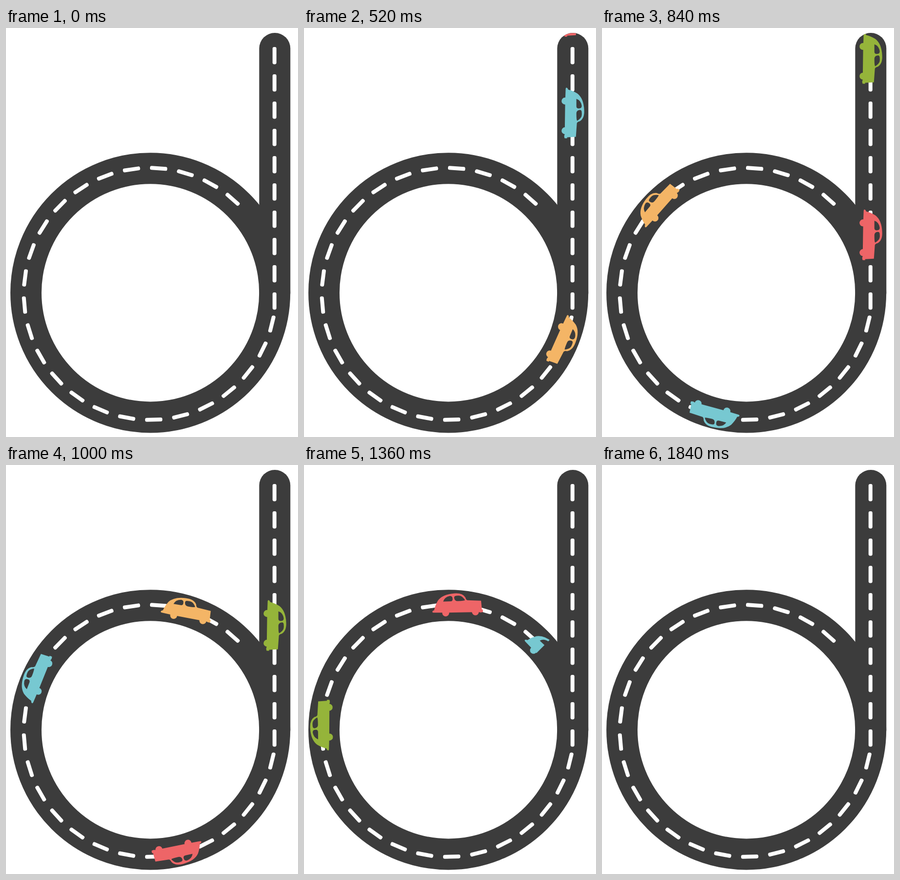
An HTML page that plays this animation: 600x840 px, repeating every 1880 ms.

```html
<!DOCTYPE html>
<html lang="en">
<head>
<meta charset="utf-8">
<title>Road letter</title>
<style>
  html, body { margin: 0; width: 100%; height: 100%; overflow: hidden; background: #fff; }
  svg { display: block; width: 600px; height: 840px; }
</style>
</head>
<body>
<svg viewBox="0 0 600 840">
  <defs>
    <clipPath id="entry"><path d="M0 840V200H520.5V42a31.9 31.9 0 0 1 63.8 0V840Z"/></clipPath>
    <clipPath id="exit"><path d="M0 0H864L24 840H0Z"/></clipPath>
    <g id="car">
      <path fill-rule="evenodd" d="M-58-2Q-58-5-54-6Q-52-15-46-25Q-36-38-12-39Q5-40 11-30Q12-25 15-24L43-22 44-4 46-4V1Q42 3 38 1L-30 0-56-1Z
        M-35-23Q-32-32-21-34Q-16-34-15.5-30Q-14-23-20-23Z
        M-12-29Q-13-34-7-34Q1-35 5-31Q9-27 10-24.5Q9-23-5-23Q-11-23-12-29Z"/>
      <circle cx="-30.5" cy=".3" r="7.2"/>
      <circle cx="30.5" cy=".3" r="7.2"/>
    </g>
  </defs>
  <g fill="none" stroke="#3c3c3c" stroke-width="64" stroke-linecap="round">
    <circle cx="296.6" cy="543.8" r="255.6"/>
    <path d="M552.3 544V42"/>
  </g>
  <g id="dashes" fill="#fff"></g>
  <g id="cars"></g>
</svg>
<script>
const LOOP = 1880, STEP = 40, GAP = 200;
const CX = 295, CY = 546, LANE = 258;
const COLORS = ['#f4b566', '#77c8d1', '#ee6567', '#95b43a'];

// Distance travelled along the lane: [ms, px]
const KEYS = [[80, -48], [160, -4.5], [280, 119], [360, 252.5], [400, 335.5], [480, 536],
  [600, 898.6], [680, 1148], [800, 1477], [920, 1725], [1000, 1847], [1120, 1977],
  [1200, 2028], [1280, 2070]];

function add(parent, tag, attrs) {
  const el = document.createElementNS('http://www.w3.org/2000/svg', tag);
  for (const k in attrs) el.setAttribute(k, attrs[k]);
  return document.getElementById(parent).appendChild(el);
}

function dash(transform) {
  add('dashes', 'rect', { x: -4, y: -17.75, width: 8, height: 35.5, rx: 3.4, transform });
}

for (let i = 0; i < 10; i++) dash(`translate(551.7 ${56.7 + 56 * i})`);
for (let i = 0; i < 25; i++) dash(`translate(295.4 546.1) rotate(${13.85 + 12.39 * i}) translate(258.4 0)`);

const cars = COLORS.map(fill => {
  const body = add('cars', 'g', { fill });
  body.innerHTML = '<use href="#car"/>';
  return body;
});

function slope(i) {
  const a = KEYS[Math.max(i - 1, 0)], b = KEYS[i], c = KEYS[Math.min(i + 1, KEYS.length - 1)];
  if (a === b || b === c) return (c[1] - a[1]) / (c[0] - a[0]);
  const before = (b[1] - a[1]) / (b[0] - a[0]), after = (c[1] - b[1]) / (c[0] - b[0]);
  return (before * (c[0] - b[0]) + after * (b[0] - a[0])) / (c[0] - a[0]);
}

// Cubic Hermite through the keys
function distance(t) {
  const i = KEYS.findIndex(k => k[0] > t) - 1;
  const [t0, s0] = KEYS[i], [t1, s1] = KEYS[i + 1];
  const d = t1 - t0, u = (t - t0) / d, v = 1 - u;
  return s0 * v * v * (1 + 2 * u) + s1 * u * u * (3 - 2 * u)
    + d * u * v * (slope(i) * v - slope(i + 1) * u);
}

function place(car, t) {
  const visible = t >= 120 && t < 1240;
  car.style.display = visible ? '' : 'none';
  if (!visible) return;
  const s = distance(t);
  const angle = Math.max(0, (s - CY) / LANE) * 180 / Math.PI;
  const rad = angle * Math.PI / 180;
  // Cars drift outwards and lag behind the curve as they go round
  const radius = 241.7 + 0.0125 * angle;
  const lag = 0.038 * Math.max(0, angle - 58);
  const x = CX + radius * Math.cos(rad);
  const y = Math.min(s, CY) + radius * Math.sin(rad);
  car.setAttribute('clip-path', `url(#${angle > 200 ? 'exit' : 'entry'})`);
  car.firstChild.setAttribute('transform', `translate(${x} ${y}) rotate(${90 + angle - lag})`);
}

function draw() {
  const t = Math.floor(performance.now() % LOOP / STEP) * STEP;
  cars.forEach((car, i) => place(car, t - i * GAP));
  requestAnimationFrame(draw);
}
draw();
</script>
</body>
</html>
```
